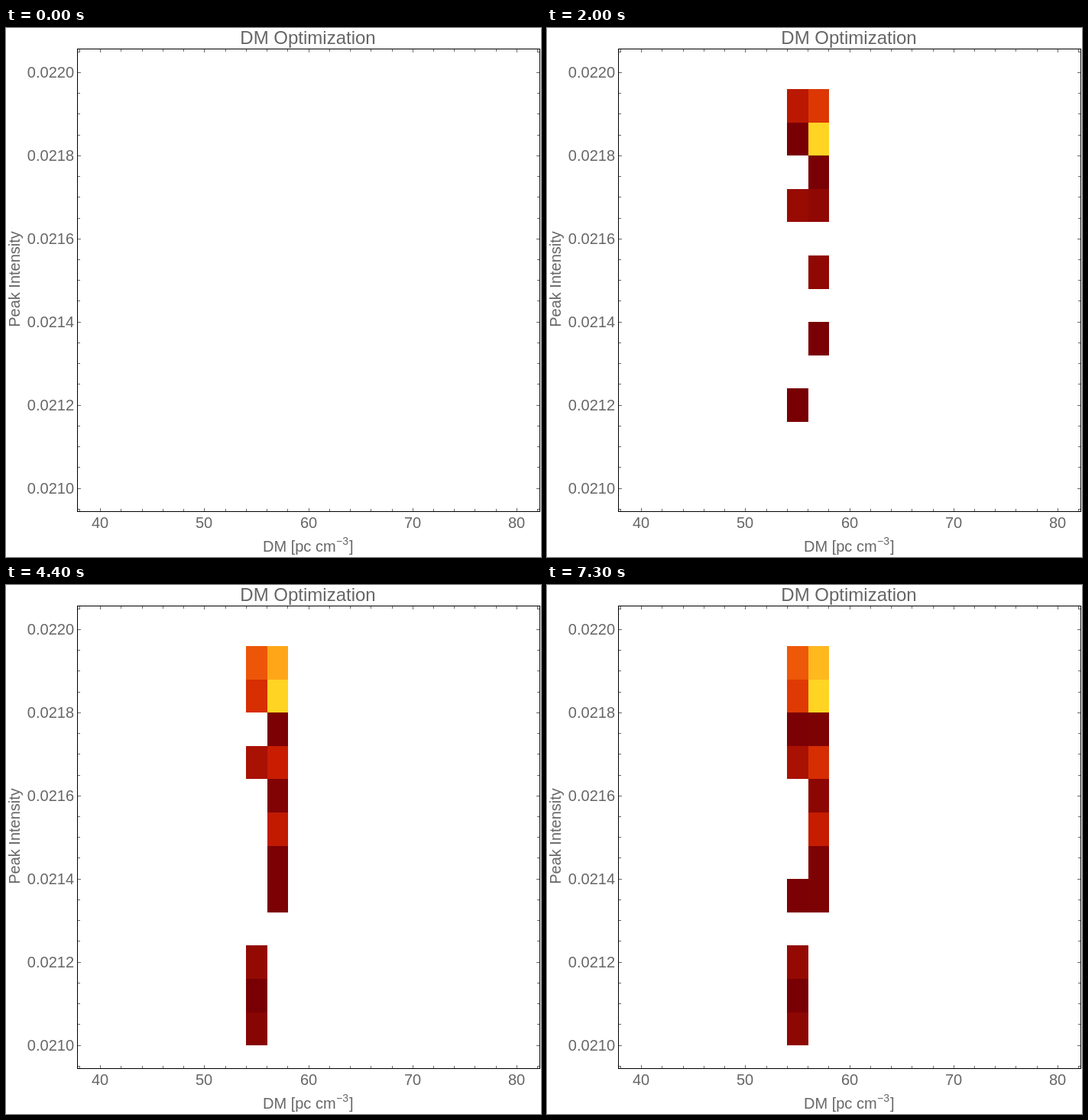
An HTML page with a canvas that plays this animation: 700x693 px, repeating every 8 s.

```html
<!DOCTYPE html>
<html>
<head>
<meta charset="utf-8">
<title>DM Optimization</title>
<style>
html, body { margin: 0; width: 100%; height: 100%; overflow: hidden; background: #fff; }
canvas { display: block; }
</style>
</head>
<body>
<canvas id="plot" width="700" height="693"></canvas>
<script>
const ctx = document.getElementById('plot').getContext('2d');
const LOOP = 8000, STEP = 100;

// Heat scale: equal steps from 0 to 1
const SCALE = ['780004', 'a30f02', 'cb1e00', 'e84706', 'ff8a12', 'ffd423']
  .map(hex => [0, 2, 4].map(i => parseInt(hex.slice(i, i + 2), 16)));

// A bin appears at `birth` (ms); after `delay` its level eases towards `peak` with time constant `tau`.
const bin = (dm, row, birth, peak = 0.025, tau = 2000, delay = 0) => ({ dm, row, birth, peak, tau, delay });
const BINS = [
  bin(56, 1, 500, 1, 10),
  bin(54, 1, 600, 0.54, 1000, 1600),
  bin(56, 0, 1000, 0.93, 1200),
  bin(54, 0, 1300, 0.65, 600, 300),
  bin(56, 3, 1300, 0.5, 2000, 200),
  bin(56, 7, 1400),
  bin(56, 2, 1500),
  bin(54, 3, 1600, 0.23, 400),
  bin(56, 5, 1700, 0.38, 1200, -100),
  bin(54, 9, 1900, 0.13, 600, 100),
  bin(54, 11, 2500, 0.1, 1500),
  bin(56, 6, 2700),
  bin(56, 4, 3000, 0.12, 3000),
  bin(54, 10, 3900, 0),
  bin(54, 7, 4800),
  bin(54, 2, 5200)
];

const xAt = dm => 123.65 + (dm - 40) * 13.62;
const yAt = intensity => 58.3 + (0.022 - intensity) * 544900;
const rowEdge = row => Math.round(yAt(0.02196 - row * 0.00008));

function heat(level) {
  const pos = level * (SCALE.length - 1);
  const i = Math.min(SCALE.length - 2, Math.floor(pos));
  return `rgb(${SCALE[i].map((c, k) => Math.round(c + (SCALE[i + 1][k] - c) * (pos - i)))})`;
}

function label(text, x, y, size = 20, align = 'center') {
  ctx.font = `${size}px "Liberation Sans", Arial, sans-serif`;
  ctx.textAlign = align;
  ctx.fillText(text, x, y);
}

function drawAxes() {
  ctx.fillStyle = '#666';
  for (let dm = 38; dm <= 82; dm += 2) {
    const x = Math.floor(xAt(dm)), major = dm % 10 === 0, len = major ? 4 : 3;
    ctx.fillRect(x, 28, 1, len);
    ctx.fillRect(x, 633 - len, 1, len);
    if (major) label(dm, x, 655);
  }
  for (let i = -1; i <= 21; i++) {
    const intensity = 0.022 - i * 0.00005;
    const y = Math.floor(yAt(intensity)), major = i % 4 === 0, len = major ? 4 : 3;
    ctx.fillRect(94, y, len, 1);
    ctx.fillRect(698 - len, y, len, 1);
    if (major) label(intensity.toFixed(4), 89, y + 7, 20, 'right');
  }
  label('DM Optimization', 395, 21, 24);
  label('DM [pc cm', 336, 686, 20, 'left');
  label('−3', 432, 677, 14, 'left');
  label(']', 449, 686, 20, 'left');
  ctx.save();
  ctx.translate(18, 329);
  ctx.rotate(-Math.PI / 2);
  label('Peak Intensity', 0, 0);
  ctx.restore();
  ctx.strokeStyle = '#000';
  ctx.strokeRect(93.5, 27.5, 605, 606);
}

function drawBins(time) {
  for (const { dm, row, birth, peak, tau, delay } of BINS) {
    if (time < birth) continue;
    const age = Math.max(0, time - birth - delay);
    const left = Math.round(xAt(dm)), top = rowEdge(row);
    ctx.fillStyle = heat(peak * (1 - Math.exp(-age / tau)));
    ctx.fillRect(left, top, Math.round(xAt(dm + 2)) - left, rowEdge(row + 1) - top);
  }
}

function draw() {
  const time = performance.now() % LOOP;
  ctx.fillStyle = '#fff';
  ctx.fillRect(0, 0, 700, 693);
  drawBins(Math.floor(time / STEP) * STEP);
  drawAxes();
  requestAnimationFrame(draw);
}
draw();
</script>
</body>
</html>
```
